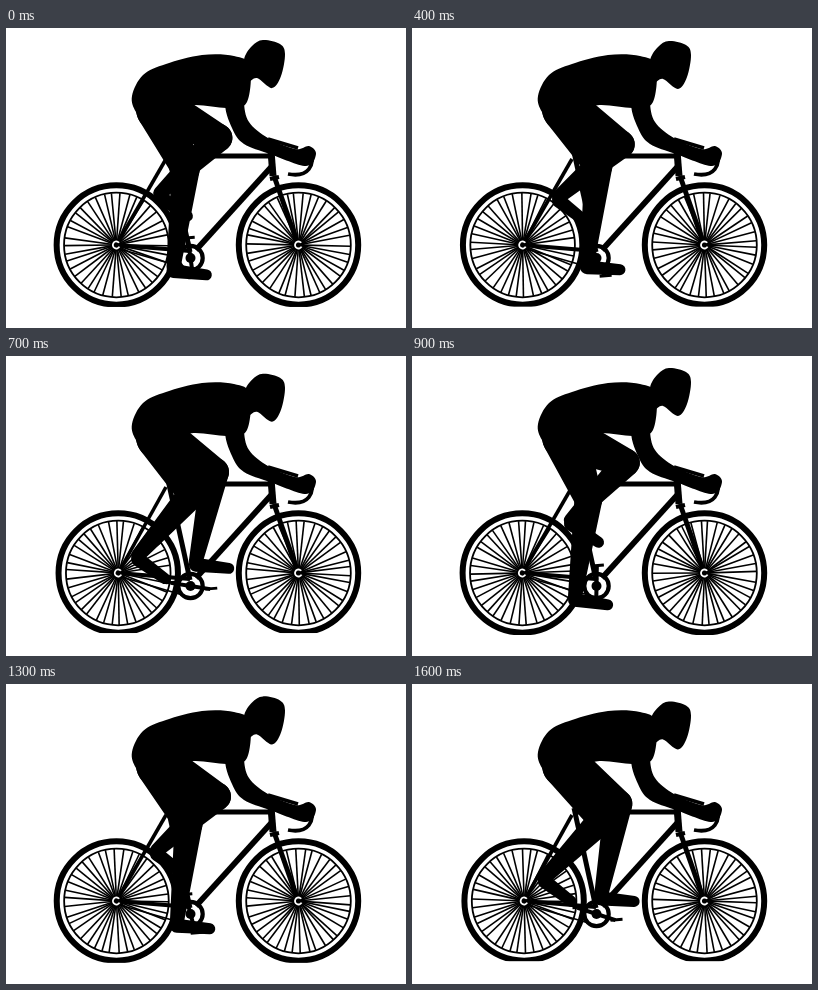
An HTML page with a canvas that plays this animation: 400 by 300 pixels, repeating every 1700 ms.

```html
<!DOCTYPE html>
<html lang="en">
<head>
<meta charset="utf-8">
<title>Cyclist</title>
<style>
html, body { margin: 0; width: 100%; height: 100%; overflow: hidden; background: #fff; }
canvas { display: block; width: 400px; height: 300px; }
</style>
</head>
<body>
<canvas id="stage" width="400" height="300"></canvas>
<script>
const ctx = document.getElementById('stage').getContext('2d');
const STEP = 100, COUNT = 17;
const START_ANGLE = 172, STEP_ANGLE = 41;
const SPOKES = 38;

const rad = deg => deg * Math.PI / 180;
const sin = deg => Math.sin(rad(deg));
const cos = deg => Math.cos(rad(deg));

function noise(n) {
  const s = Math.sin(n * 127.1) * 43758.5453;
  return s - Math.floor(s);
}

function line(width, x1, y1, x2, y2) {
  ctx.lineWidth = width;
  ctx.beginPath();
  ctx.moveTo(x1, y1);
  ctx.lineTo(x2, y2);
  ctx.stroke();
}

function ring(x, y, r, width) {
  ctx.lineWidth = width;
  ctx.beginPath();
  ctx.arc(x, y, r, 0, Math.PI * 2);
  ctx.stroke();
}

function disc(x, y, r) {
  ctx.beginPath();
  ctx.arc(x, y, r, 0, Math.PI * 2);
  ctx.fill();
}

// Two circles joined by their outer tangents.
function taper(x1, y1, r1, x2, y2, r2) {
  const a = Math.atan2(y2 - y1, x2 - x1);
  const b = Math.acos((r1 - r2) / Math.hypot(x2 - x1, y2 - y1));
  ctx.beginPath();
  ctx.arc(x1, y1, r1, a + b, a - b + Math.PI * 2);
  ctx.arc(x2, y2, r2, a - b, a + b);
  ctx.fill();
}

// Smooth closed curve through the points.
function blob(p) {
  const n = p.length, at = i => p[(i + n) % n];
  ctx.beginPath();
  ctx.moveTo(...p[0]);
  for (let i = 0; i < n; i++) {
    const [a, b, c, d] = [at(i - 1), at(i), at(i + 1), at(i + 2)];
    ctx.bezierCurveTo(
      b[0] + (c[0] - a[0]) / 6, b[1] + (c[1] - a[1]) / 6,
      c[0] - (d[0] - b[0]) / 6, c[1] - (d[1] - b[1]) / 6, c[0], c[1]);
  }
  ctx.fill();
}

function wheel(x, y, turn, seed) {
  ring(x, y, 59.7, 6);
  ring(x, y, 52.3, 1.8);
  for (let i = 0; i < SPOKES; i++) {
    const a = turn + (i + (noise(i + seed) - 0.5) * 0.4) * 360 / SPOKES;
    line(1.6, x + cos(a) * 5, y + sin(a) * 5, x + cos(a) * 52, y + sin(a) * 52);
  }
}

function hub(x, y) {
  disc(x, y, 6);
  ctx.strokeStyle = '#fff';
  ctx.lineWidth = 1.8;
  ctx.beginPath();
  ctx.arc(x, y, 3.5, 0.5, 5.6);
  ctx.stroke();
  ctx.strokeStyle = '#000';
}

function bicycle(rear, front, y) {
  line(3.6, 160, 131, rear, y);
  line(4, rear, y, 184, 223);
  line(1.8, rear, y + 3, 180, 240);
  line(5, 162, 124, 184, 224);
  line(5, 165, 128, 266, 128);
  line(5.6, 267, 137, 190, 222);
  line(7, 265, 123, 267, 148);
  line(4, 264, 151, 273, 149);
  line(5, 268, 148, front - 1, y - 2);
  line(3.5, 262, 111, 292, 120);
  ctx.lineWidth = 3.8;
  ctx.beginPath();
  ctx.moveTo(305, 122);
  ctx.bezierCurveTo(309, 137, 303, 150, 282, 146);
  ctx.stroke();
  hub(rear, y);
  hub(front, y);
}

function crankset(angle) {
  const x = 184.5, y = 230;
  ring(x, y, 12.2, 4.2);
  disc(x, y, 5);
  for (const side of [0, 180]) {
    const px = x + 20 * sin(angle + side), py = y - 20 * cos(angle + side);
    line(4, x, y, px, py);
    line(3, px - 5, py, px + 7, py - 1);
  }
}

// Heel follows the pedal; thigh and foot rock with the crank.
function leg(angle) {
  const hipX = 153, hipY = 81;
  const thigh = 46 - 29 * cos(angle - 38);
  const pitch = 21 - 18 * sin(angle - 45);
  const kneeX = hipX + 66 * cos(thigh), kneeY = hipY + 66 * sin(thigh);
  const heelX = 161 + 29 * sin(angle - 5), heelY = 206 - 38 * cos(angle - 5);
  taper(hipX, hipY, 23, kneeX, kneeY, 14);
  taper(kneeX, kneeY, 14, heelX, heelY - 4, 7);
  taper(heelX, heelY, 7, heelX + 33 * cos(pitch), heelY + 33 * sin(pitch), 5.5);
}

function rider(bob) {
  const torso = [[126, 68], [137, 47], [160, 36], [196, 27], [228, 28], [244, 38],
    [241, 74], [222, 80], [182, 78], [160, 98], [143, 97], [130, 84]];
  const arm = [[241, 56], [238, 74], [243, 94], [262, 110], [289, 121], [303, 118],
    [310, 126], [300, 138], [264, 126], [238, 116], [226, 100], [220, 74]];
  const head = [[238, 36], [246, 22], [257, 16], [274, 20], [279, 30],
    [275, 52], [266, 64], [251, 54], [241, 57]];
  blob(torso);
  blob(arm);
  blob(head.map(([x, y]) => [x, y + bob]));
}

function draw(step) {
  const angle = START_ANGLE + step * STEP_ANGLE;
  const sway = cos(2 * angle);
  const rear = 111.3 - sway, front = 292.5, y = 217;
  const ground = 278 + sway;
  ctx.fillStyle = '#fff';
  ctx.fillRect(0, 0, 400, 300);
  ctx.fillStyle = ctx.strokeStyle = '#000';
  wheel(rear, y, step * STEP_ANGLE, 3);
  wheel(front, y, step * STEP_ANGLE, 60);
  bicycle(rear, front, y);
  crankset(angle);
  leg(angle);
  leg(angle + 180);
  rider(-1 - 3 * sway);
  ctx.fillStyle = '#fff';
  ctx.fillRect(0, ground, 400, 300 - ground);
}

const start = performance.now();
function tick() {
  draw(Math.floor((performance.now() - start) / STEP) % COUNT);
  requestAnimationFrame(tick);
}
tick();
</script>
</body>
</html>
```
